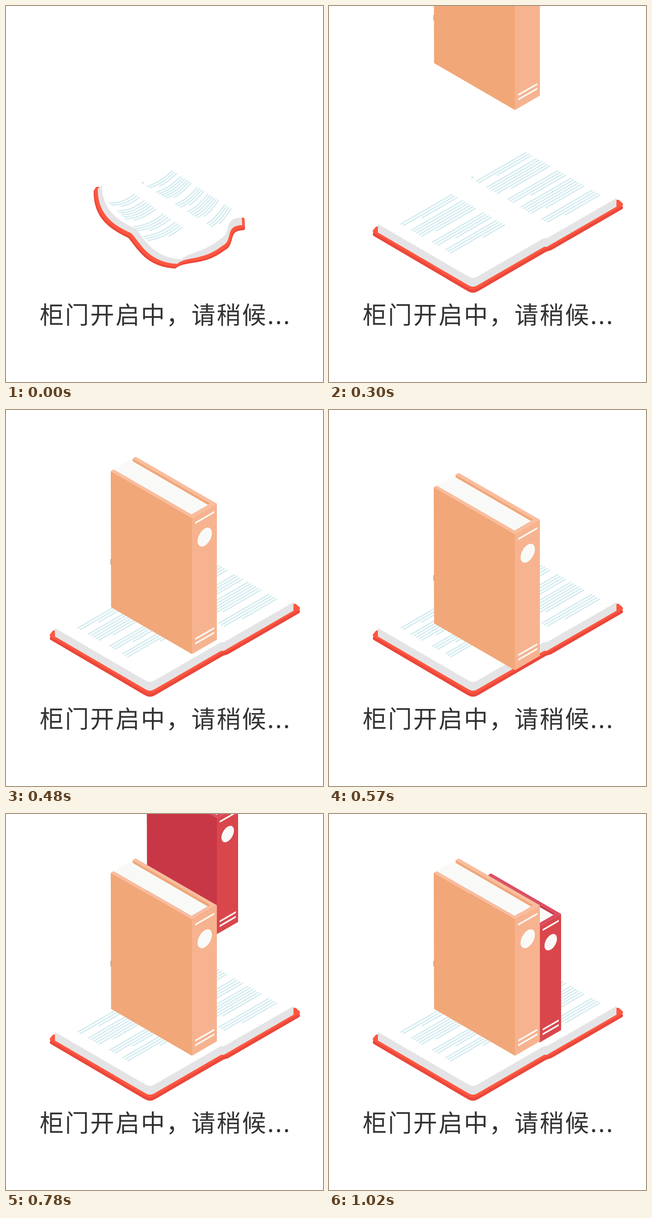
An HTML page for the animation above (1.5 s loop, 687 by 815 pixels).

```html
<!DOCTYPE html>
<html lang="zh-CN">
<head>
<meta charset="utf-8">
<title>Loading</title>
<style>
  html, body { margin: 0; width: 100%; height: 100%; overflow: hidden; background: #fff; }
  svg { display: block; width: 687px; height: 815px; }
  text { font: 500 52px "Noto Sans CJK SC", "Noto Sans CJK", "Noto Sans SC", sans-serif; letter-spacing: 2.8px; fill: #333; }
</style>
</head>
<body>
<svg id="stage" viewBox="0 0 687 815">
  <g id="base" stroke-linejoin="round"></g>
  <g id="red"></g>
  <g id="orange"></g>
  <text x="73" y="689">柜门开启中，请稍候...</text>
</svg>
<script>
const LOOP = 1500, STEP = 30, SLOPE = 0.577;
const byId = id => document.getElementById(id);

function add(parent, tag, attrs) {
  const el = document.createElementNS("http://www.w3.org/2000/svg", tag);
  for (const name in attrs) el.setAttribute(name, attrs[name]);
  return parent.appendChild(el);
}
const mix = (a, b, k) => [a[0] + (b[0] - a[0]) * k, a[1] + (b[1] - a[1]) * k];
const thirds = (a, b) => [mix(a, b, 1 / 3), mix(a, b, 2 / 3)];
const poly = pts => "M" + pts.map(p => p.map(v => v.toFixed(2)).join()).join("L");

// Open book: wavy rim at the start, straight rim at rest
const WAVY = [
  [194, 402], [193, 455], [225, 480], [267, 499], [285, 518], [303, 562],
  [366, 565], [366, 565], [366, 565], [385, 548], [430, 560],
  [472, 526], [474, 525], [494, 512], [476, 483], [514, 482]
];
const coverEnds = { wavy: [[198, 396], [513, 463]], flat: [[104, 482], [626, 424]] };
const pageEnds = { wavy: [[207, 389], [511, 457]], flat: [[106, 472], [623, 417]] };

// corners: left, tip, both sides of the fold, right; shifts: of the wavy rim's left and right part
const layers = [
  { fill: "#ea473b", stroke: 8, ends: coverEnds, shifts: [[0, 0], [0, 0]],
    corners: [[99, 495], [312, 620], [469, 529], [479, 526], [633, 437]] },
  { fill: "#ff563f", stroke: 8, ends: coverEnds, shifts: [[2, -4], [-1, -4]],
    corners: [[99, 488], [312, 613], [469, 522], [479, 519], [633, 430]] },
  { fill: "#e4e4e6", stroke: 0, ends: pageEnds, shifts: [[5, -6], [-2, -7]],
    corners: [[106, 491], [312, 611], [466, 522], [472, 522], [623, 435]] },
  { fill: "#fff", stroke: 0, ends: pageEnds, shifts: [[14, -16], [-5, -23]],
    corners: [[106, 472.6], [312, 592], [466, 503], [472, 503.5], [623, 416.5]] }
];

function rimPath({ corners: [left, tip, fold, fold2, right], shifts, ends }, k) {
  const mid = mix(left, tip, 0.5);
  const tipIn = [tip[0] - 9, tip[1] - 5.2], tipOut = [tip[0] + 9, tip[1] - 5.2];
  const flat = [
    left, ...thirds(left, mid), mid, ...thirds(mid, tipIn), tipIn, tip, tipOut,
    ...thirds(tipOut, fold), fold, fold2, ...thirds(fold2, right), right
  ];
  const p = flat.map((pt, i) => {
    const [dx, dy] = shifts[i < 10 ? 0 : 1];
    return mix(pt, [WAVY[i][0] + dx, WAVY[i][1] + dy], k);
  });
  const [a, b] = [0, 1].map(i => mix(ends.flat[i], ends.wavy[i], k));
  return `M${a}L${p[0]}C${p.slice(1, 4)}C${p.slice(4, 7)}Q${p.slice(7, 9)}` +
    `C${p.slice(9, 12)}L${p[12]}C${p.slice(13, 16)}L${b}Z`;
}

// Printed lines: groups are [first row, last row, indent of the last row]
const pages = [
  { start: [155, 473], width: 112, rows: 20, sag: 6,
    wavy: [[223, 427], [279, 408], [311, 513], [383, 479]],
    groups: [[0, 2, 34], [4, 9, 25], [12, 15, 34], [17, 20, 65]] },
  { start: [318, 380.5], width: 110, rows: 28, sag: 5,
    wavy: [[305, 391], [361, 357], [450, 482], [488, 439]],
    groups: [[0, 2, 34], [4, 9, 25], [12, 15, 34], [17, 22, 26], [25, 28, 34]] }
];

function printPath({ start, width, rows, sag, wavy, groups }, k) {
  const point = (row, s) => {
    const x = row * 5.7, dx = s * width, v = row / rows;
    const flat = [start[0] + x + dx, start[1] + (x - dx) * SLOPE];
    const bent = mix(mix(wavy[0], wavy[1], s), mix(wavy[2], wavy[3], s), v);
    bent[1] += sag * Math.sin(Math.PI * s);
    return mix(flat, bent, k);
  };
  let d = "";
  for (const [first, last, indent] of groups) {
    for (let row = first; row <= last; row++) {
      const from = row === last ? indent / width : 0;
      const pts = [];
      for (let j = 0; j <= 8; j++) pts.push(point(row, from + (1 - from) * j / 8));
      d += poly(pts);
    }
  }
  return d;
}

const base = byId("base");
for (const layer of layers) {
  layer.el = add(base, "path", { fill: layer.fill, stroke: layer.fill, "stroke-width": layer.stroke });
}
for (const page of pages) {
  page.el = add(base, "path", { fill: "none", stroke: "#d3ebef", "stroke-width": 2.7 });
}
const dot = add(base, "ellipse", { rx: 3.2, ry: 2, fill: "#d3ebef" });

function drawBase(k) {
  for (const layer of layers) layer.el.setAttribute("d", rimPath(layer, k));
  for (const page of pages) page.el.setAttribute("d", printPath(page, k));
  const [x, y] = mix([311, 371.5], [297, 383], k);
  dot.setAttribute("cx", x);
  dot.setAttribute("cy", y);
}

// Standing book; (x, y) is the top of the edge between front and spine
function standingBook(g, { x, y, width, depth, height, front, spine, rim, mark }) {
  const top = (a, b) => [x + a - b, y - (a + b) * SLOPE];
  const down = ([px, py], h) => [px, py + h];
  const face = (fill, ...pts) => add(g, "path", { fill, d: poly(pts) + "Z" });
  const white = "#f9faf8", u = depth / 54;
  const edge = top(0, 0), left = top(0, width), right = top(depth, 0);
  const wall = 47.5 * u, lip = 6.5 * u, inset = 7.5 * u;

  face(rim, edge, left, top(lip, width), top(lip, inset), top(wall, inset), top(wall, width), top(depth, width), right);
  face(white, top(lip, inset), top(lip, width), top(wall, width), top(wall, inset));
  face(front, top(wall, width), down(top(wall, width), 6 * u), top(42 * u, inset), top(wall, inset));
  face(front, edge, left, down([left[0] + 0.7, left[1]], height), down(edge, height));
  face(spine, edge, right, down(right, height), down(edge, height));

  const skew = add(g, "g", { transform: `matrix(1 ${-SLOPE} 0 1 ${x} ${y})`, fill: white });
  for (const my of mark.bars) add(skew, "rect", { x: mark.x, y: my - 2, width: mark.width, height: 4 });
  add(skew, "ellipse", { cx: mark.x + mark.width / 2, cy: mark.cy, rx: mark.rx, ry: mark.rx * 1.19 });
}

standingBook(byId("orange"), {
  x: 403, y: 229, width: 176, depth: 54, height: 295,
  front: "#f1a778", spine: "#f7b38f", rim: "#f9bd9e",
  mark: { x: 7, width: 41.5, bars: [15, 266.5, 276.5], cy: 57.5, rx: 15.5 }
});
add(byId("orange"), "rect", { x: 226.5, y: 318, width: 1, height: 12, fill: "#a5784f" });
standingBook(byId("red"), {
  x: 457, y: 243, width: 152, depth: 46, height: 252,
  front: "#c83746", spine: "#d9474d", rim: "#dc4c60",
  mark: { x: 6, width: 35, bars: [12, 228, 238], cy: 48.5, rx: 13.5 }
});

// Constant fall past the resting place, then a constant rise back to it
function drop(t, cross, end) {
  return t >= end ? 0 : Math.min((t - cross) * 1.687, (end - t) * 4 / 3);
}
const place = (id, dy) => byId(id).setAttribute("transform", `translate(0 ${dy.toFixed(2)})`);

function render(time) {
  const t = Math.floor(time % LOOP / STEP) * STEP;
  drawBase(Math.max(0, 1 - t / 90));
  place("orange", drop(t, 477, 600));
  place("red", drop(t, 919, 1020));
}

const begin = performance.now();
function tick() {
  render(performance.now() - begin);
  requestAnimationFrame(tick);
}
tick();
</script>
</body>
</html>
```
